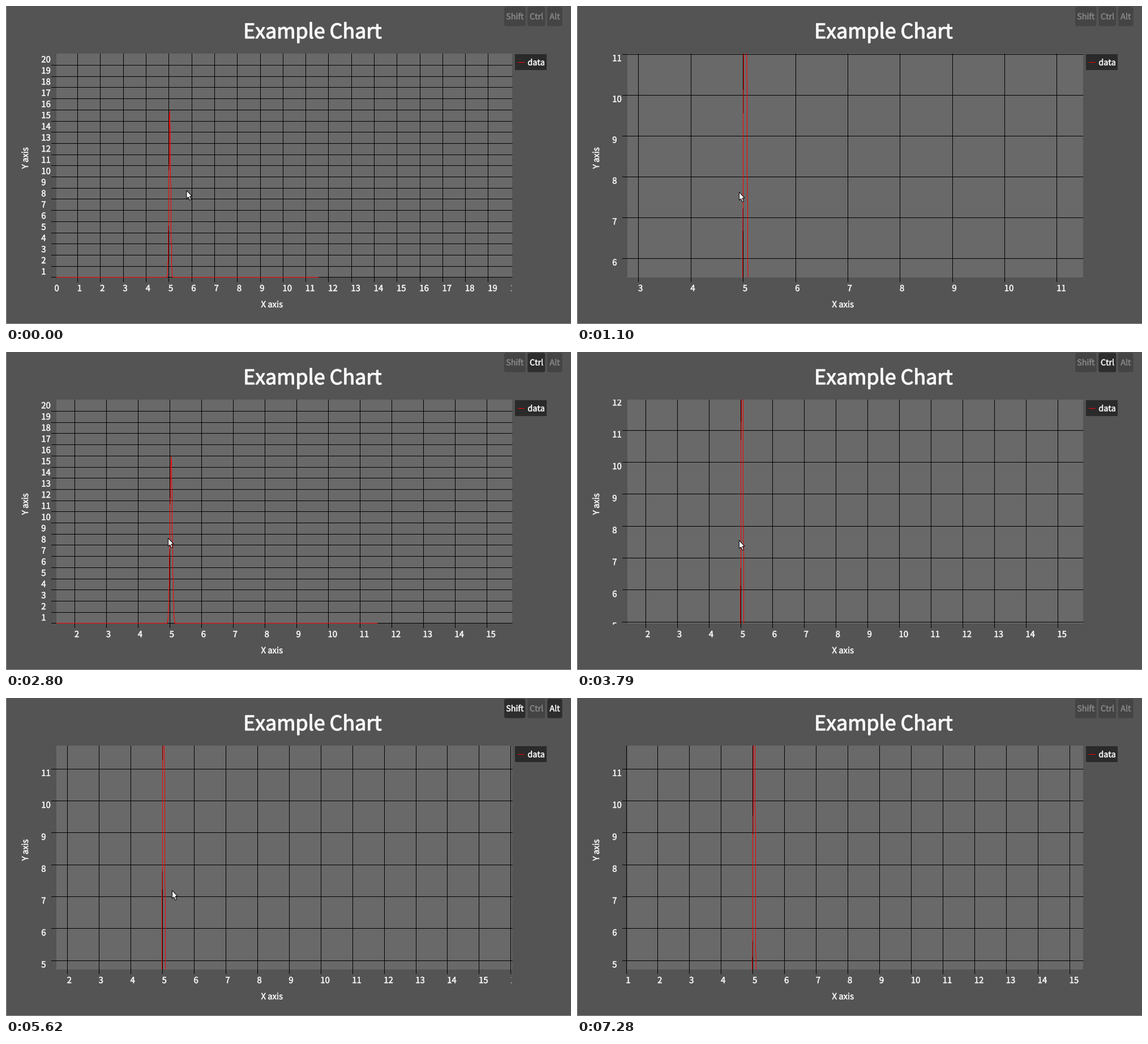
Recreate the animation shown at these times as a matplotlib script. Size 998x561 px, loop 7570 ms.

```python
import numpy as np
import matplotlib.pyplot as plt
from matplotlib.animation import FuncAnimation
from matplotlib.patches import FancyBboxPatch, PathPatch, Polygon, Rectangle
from matplotlib.path import Path
from matplotlib.textpath import TextPath

W, H, DPI = 998, 561, 64
PX = 72 / DPI                      # one pixel in points
LOOP, STEP, TICK = 7570, 10, 88    # ms; motion advances once per tick
FONT = {"family": "Noto Sans CJK JP"}

BACK, PLOT, EDGE = "#545454", "#696969", "#929292"
TEXT, RED, DARK = "#f8f8f8", "#ff0000", "#2a2a2a"
KEY_ON, KEY_OFF, KEY_DIM = "#2d2d2d", "#444444", "#858585"

# Plot rectangle, and the area its value ranges map to
LEFT, TOP, RIGHT, BOTTOM = 89, 84, 894.5, 479
X0, XW = 86.3, 806
Y0, YH = 478.85, 394
RANGE = 20
FOCUS_X, FOCUS_Y = 0.2444, 0.3809  # zoom centre as a part of the plot
PEAK, CENTRE, SIGMA = 14.95, 5.038, 0.037

# Name, width and the times each key is held
KEYS = [("Shift", 37.5, [(1830, 2680), (5440, 6650)]),
        ("Ctrl", 31, [(2780, 4170), (4460, 5440)]),
        ("Alt", 26.5, [(4460, 6740)])]

plt.rcParams["path.simplify"] = False
fig = plt.figure(figsize=(W / DPI, H / DPI), dpi=DPI, facecolor=BACK)
ax = fig.add_axes([0, 0, 1, 1])
ax.set(xlim=(0, W), ylim=(H, 0))
ax.axis("off")


def ramp(t, start, n):
    """Rise from 0 to 1 in n equal ticks, the first one at start."""
    return min(max((t - start) // TICK + 1, 0), n) / n


def zoom(t):
    """Units taken off the x and y ranges."""
    both = ramp(t, 460, 8) - ramp(t, 1190, 4)
    zx = (11.276 * (both + ramp(t, 1830, 3))
          + 2.2 * ramp(t, 2100, 2) - 7.88 * ramp(t, 2390, 3))
    zy = 14.532 * both + 5.2 * ramp(t, 2880, 4) + 7.8 * ramp(t, 3350, 6)
    return zx, zy


def pan(t):
    """Shift of the chart in pixels."""
    return (47.7 * ramp(t, 5800, 6) - 26.4 * ramp(t, 5620, 2),
            -13 * ramp(t, 4460, 10))


def pointer(t):
    leave = ramp(t, 6560, 8)
    return (319 - 32.5 * ramp(t, 90, 2) + 7 * ramp(t, 5620, 1) + 304 * leave,
            325.5 + 3 * ramp(t, 90, 2) + 4 * ramp(t, 3350, 6)
            + 7 * ramp(t, 4460, 10) + 203 * leave)


def pixel(v):
    return np.floor(v) + 0.5


def glyphs(s, size):
    p = TextPath((0, 0), s, size=size, prop=FONT)
    return p.vertices * [1, -1], p.codes


def text_patch(weight=0.6):
    patch = PathPatch(Path(np.zeros((1, 2))), fc=TEXT, ec=TEXT,
                      lw=weight * PX, zorder=5)
    ax.add_patch(patch)
    return patch


def caption(s, x, y, size, weight=0.6, upright=False):
    """Text centred along its baseline; upright text reads upwards."""
    verts, codes = glyphs(s, size)
    verts[:, 0] -= (verts[:, 0].min() + verts[:, 0].max()) / 2
    if upright:
        verts = np.column_stack([verts[:, 1], -verts[:, 0]])
    patch = text_patch(weight)
    patch.set_path(Path(verts + [x, y], codes))
    return patch


def box(x, y, w, h, color):
    ax.add_patch(Rectangle((x, y), w, h, fc=color, lw=0))


def clip(artist, x0, y0, x1, y1):
    artist.set_clip_path(Rectangle((x0, y0), x1 - x0, y1 - y0,
                                   transform=ax.transData))


# Static parts
box(0, 0, 1, H, EDGE)
box(0, H - 1, W, 1, EDGE)
box(LEFT, TOP, RIGHT - LEFT, BOTTOM - TOP, PLOT)
box(899, 84.5, 56.5, 28.5, DARK)
box(904, 99, 12.5, 1, RED)
caption("Example Chart", 541.2, 57, 35.8, 1.2)
caption("X axis", 469.5, 531.5, 14.8)
caption("Y axis", 39, 268.5, 14.8, upright=True)
caption("data", 936, 104.5, 14.3)

caps, key_x = [], 880
for name, w, held in KEYS:
    cap = FancyBboxPatch((key_x, 1.5), w, 34, lw=0,
                         boxstyle="round,pad=0,rounding_size=3")
    ax.add_patch(cap)
    caps.append((cap, caption(name, key_x + w / 2, 23.5, 14.3), held))
    key_x += w + 3.75

# Moving parts
grid, = ax.plot([], [], color="black", lw=PX, zorder=2, snap=False,
                solid_capstyle="butt")
curve, = ax.plot([], [], color=RED, lw=PX, zorder=3, snap=False,
                 drawstyle="steps-mid")
clip(curve, LEFT, TOP, RIGHT, BOTTOM)
x_labels, y_labels = text_patch(), text_patch()
clip(x_labels, 86, 480, 893.5, 520)
clip(y_labels, 55, TOP, 90, 481)
ARROW = np.array([(0, 0), (0, 14.2), (3.2, 11.4), (5.6, 17), (8, 16),
                  (5.6, 10.4), (9.6, 10.2)])
mouse = Polygon(ARROW, fc="white", ec="black", lw=PX, zorder=9)
ax.add_patch(mouse)

data_x = np.concatenate([[0], np.linspace(4.85, 5.23, 160), [11.54]])
data_y = PEAK * np.exp(-((data_x - CENTRE) / SIGMA) ** 2 / 2)
NUMBERS = [glyphs(str(n), 14.9) for n in range(RANGE + 10)]


def set_labels(patch, spots):
    """Fill a patch with (number, x, baseline) labels."""
    verts = [NUMBERS[n][0] + [x, y] for n, x, y in spots]
    codes = [NUMBERS[n][1] for n, _, _ in spots]
    patch.set_path(Path(np.concatenate(verts), np.concatenate(codes)))


def whole(lo, hi):
    return range(max(0, int(np.floor(lo))), int(np.ceil(hi)) + 1)


def draw_chart(t):
    (zx, zy), (px, py) = zoom(t), pan(t)
    sx, sy = XW / (RANGE - zx), YH / (RANGE - zy)
    x_min, y_min = zx * FOCUS_X - px / sx, zy * FOCUS_Y + py / sy
    x_max, y_max = x_min + XW / sx, y_min + YH / sy

    def to_x(v):
        return X0 + (v - x_min) * sx

    def to_y(v):
        return Y0 - (v - y_min) * sy

    columns, rows = whole(x_min, x_max), whole(y_min, y_max)
    gx, gy = [], []
    for v in columns:
        if x_min < v < x_max:
            gx += [pixel(to_x(v))] * 2 + [np.nan]
            gy += [TOP, 487, np.nan]
    for v in rows:
        if y_min <= v < y_max:
            gx += [80, RIGHT, np.nan]
            gy += [pixel(to_y(v))] * 2 + [np.nan]
    grid.set_data(gx, gy)
    curve.set_data(pixel(to_x(data_x)), pixel(to_y(data_y)))

    drop = 12.2 + 2.4 * max(0, 1 - (sy - YH / RANGE) / 20)
    set_labels(x_labels, [(v, to_x(v) - 0.8, 503) for v in columns])
    set_labels(y_labels, [(v, 62.3, to_y(v) + drop) for v in rows])


def update(i):
    t = i * STEP
    draw_chart(t)
    for cap, label, held in caps:
        on = any(a <= t < b for a, b in held)
        cap.set_facecolor(KEY_ON if on else KEY_OFF)
        label.set_color(TEXT if on else KEY_DIM)
    mouse.set_xy(ARROW + pointer(t))
    mouse.set_visible(ramp(t, 6560, 9) < 1)
    return []


anim = FuncAnimation(fig, update, frames=LOOP // STEP, interval=STEP,
                     init_func=lambda: update(0), repeat=True)
plt.show()
```
